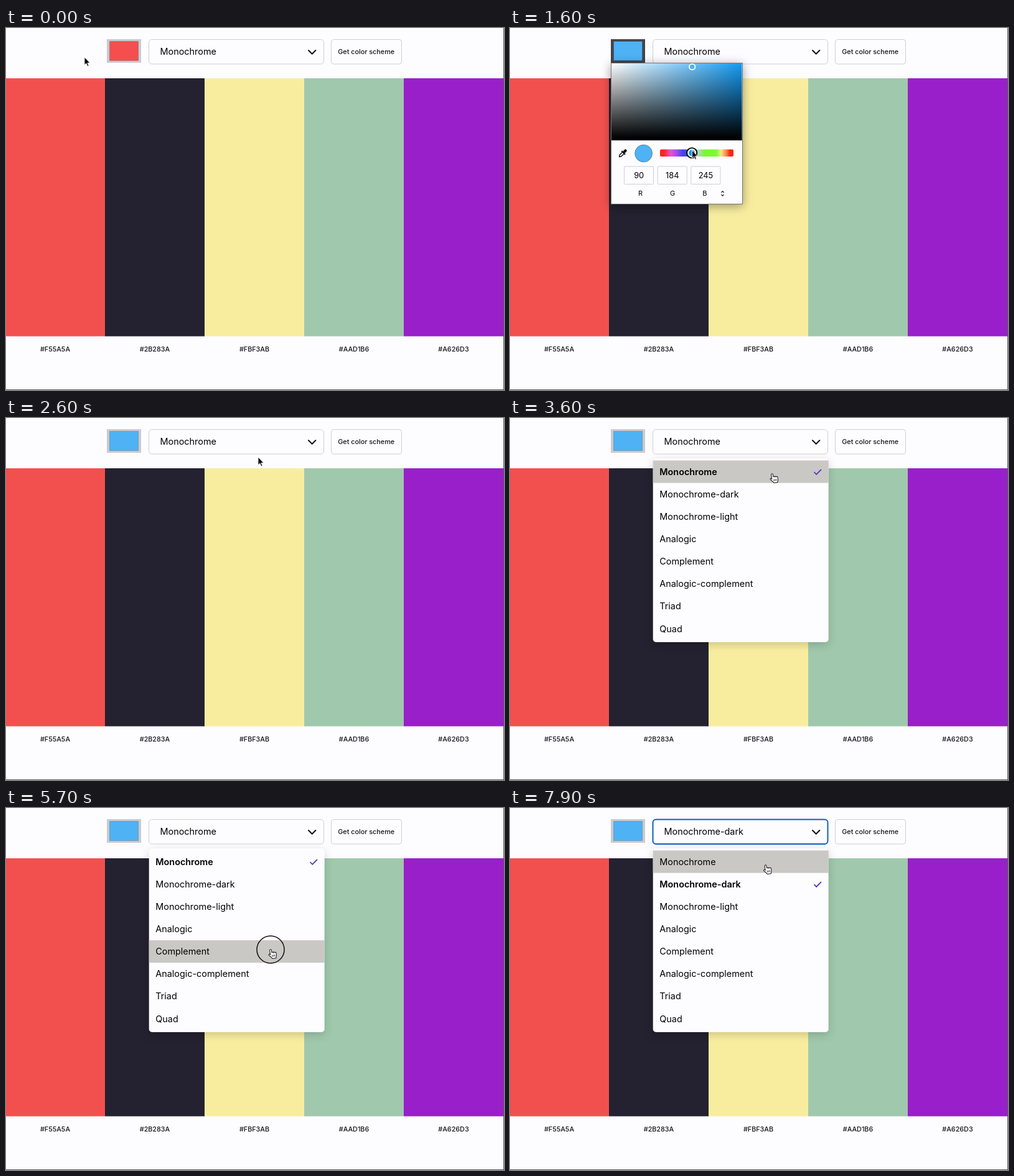
These frames come from a looping animation (800x583 px, 8 s). An HTML page:

```html
<!DOCTYPE html>
<html lang="en">
<head>
<meta charset="utf-8">
<title>Color scheme picker</title>
<style>
html, body { margin: 0; width: 100%; height: 100%; overflow: hidden; background: #fdfcff; }
svg { display: block; width: 100%; height: 100%; }
text { font-family: Inter, sans-serif; font-size: 14.4px; fill: #000; }
.small { font-size: 10.8px; font-weight: 500; fill: #14141c; text-anchor: middle; }
.num { font-size: 12.8px; text-anchor: middle; }
.rgb { font-size: 11px; text-anchor: middle; }
.box { fill: #fdfcff; stroke: #cfcfd4; }
#picker { filter: drop-shadow(0 3px 8px rgba(0, 0, 0, .38)); }
#menu { filter: drop-shadow(0 4px 7px rgba(0, 0, 0, .17)); }
</style>
</head>
<body>
<svg viewBox="0 0 800 583" preserveAspectRatio="none">
  <defs>
    <linearGradient id="sat"><stop stop-color="#fff"/><stop id="pure" offset="1"/></linearGradient>
    <linearGradient id="dark" x2="0" y2="1"><stop stop-opacity="0"/><stop offset=".97"/></linearGradient>
    <linearGradient id="hues">
      <stop offset=".05" stop-color="#fb2616"/><stop offset=".15" stop-color="#e552dc"/>
      <stop offset=".24" stop-color="#9a4ae8"/><stop offset=".31" stop-color="#4444ea"/>
      <stop offset=".41" stop-color="#3c50ee"/><stop offset=".46" stop-color="#5cb4e8"/>
      <stop offset=".52" stop-color="#b4d8bc"/><stop offset=".61" stop-color="#76fa30"/>
      <stop offset=".77" stop-color="#7cfb36"/><stop offset=".83" stop-color="#f4e88c"/>
      <stop offset=".9" stop-color="#f68a4c"/><stop offset=".95" stop-color="#fb2616"/>
    </linearGradient>
  </defs>
  <rect width="800" height="583" fill="#fdfcff"/>
  <g id="bars"></g>
  <path d="M799.5 0V583M0 582.5H800" stroke="#5c5b62"/>

  <rect id="frame" x="162" y="18" width="55" height="38"/>
  <rect id="swatch" x="166.5" y="21.5" width="46" height="31" stroke="#000" stroke-opacity=".18"/>
  <rect id="select" class="box" x="229.5" y="18.5" width="281" height="39.5" rx="5"/>
  <text id="choice" x="247.6" y="43.2"></text>
  <path d="M486 36l5.7 5.7 5.7-5.7" fill="none" stroke="#111" stroke-width="2" stroke-linecap="round" stroke-linejoin="round"/>
  <rect class="box" x="522.5" y="18.5" width="113" height="39.5" rx="4"/>
  <text class="small" x="578.7" y="41.6">Get color scheme</text>

  <g id="picker">
    <rect x="162.5" y="56.5" width="211" height="227" fill="#fdfcff" stroke="#77777c"/>
    <rect x="163" y="57" width="209.5" height="124" fill="url(#sat)"/>
    <rect x="163" y="57" width="209.5" height="124" fill="url(#dark)"/>
    <circle id="svFocus" cx="292.7" cy="62.5" r="6.5" fill="none" stroke="#000" stroke-width="2.2"/>
    <circle id="svThumb" cx="292.7" cy="62.5" r="4.7" stroke="#fff" stroke-width="1.8"/>
    <g transform="translate(181 202) rotate(45)" stroke="#111">
      <rect x="-1.7" y="-8" width="3.4" height="6" rx="1.6" fill="#111"/>
      <path d="M-4-1.6H4" stroke-width="2"/>
      <path d="M-1.8-1V5L0 7.6 1.8 5V-1" fill="none" stroke-width="1.4"/>
    </g>
    <circle id="dot" cx="214.6" cy="202" r="14" stroke="#000" stroke-opacity=".3"/>
    <rect x="241" y="195.5" width="118" height="11.5" rx="2" fill="url(#hues)"/>
    <g id="hueThumb">
      <circle id="hueFocus" r="8" fill="none" stroke="#000" stroke-width="2"/>
      <circle id="hueDot" r="6" stroke="#fff" stroke-width="2"/>
    </g>
    <g id="fields"></g>
    <path d="M339.4 265l2.1-2.2 2.1 2.2M339.4 268.2l2.1 2.2 2.1-2.2" fill="none" stroke="#111" stroke-width="1.1"/>
  </g>

  <g id="menu">
    <rect x="229.7" y="65" width="282" height="296" rx="5" fill="#fdfcff"/>
    <rect id="hover" x="229.7" width="282" height="36.15" fill="#c9c8c4"/>
    <g id="options"></g>
    <path id="check" d="M488.5 .5l3.7 3.8 7.8-8" fill="none" stroke="#4b2fd0" stroke-width="1.7"/>
  </g>

  <circle id="ring" fill="none" stroke="#111" stroke-width="1.5"/>
  <g id="cursor">
    <path id="arrow" d="M0 0V12.6L2.9 10 5 14.7 7 13.8 4.9 9.3H8.9z" fill="#000" stroke="#fff" stroke-width=".9"/>
    <g id="hand" transform="rotate(-8)">
      <path d="M-1.5 8V1.2a1.4 1.4 0 0 1 2.8 0V5.2a1.3 1.2 0 0 1 2.5 .2 1.2 1.1 0 0 1 2.3 .5 1.1 1.1 0 0 1 2 .9V10.2c0 2-1.2 2.5-1.3 4.6H.7C.5 13-1.8 11.6-3.8 8.6c-.9-1.5 .9-2.6 2.3-.6z" fill="#fff" stroke="#111"/>
      <path d="M1.4 9v3M3.4 9v3M5.4 9v3" stroke="#111" stroke-width=".8"/>
    </g>
  </g>
</svg>
<script>
const LOOP = 8000, STEP = 100, ROW = 36.15, TOP = 68.4;
const $ = id => document.getElementById(id);
const set = (id, attrs) => { for (const k in attrs) $(id).setAttribute(k, attrs[k]); };
const show = (id, on) => { $(id).style.display = on ? '' : 'none'; };
const within = (t, spans) => spans.some(([a, b]) => t >= a && t < b);

const bars = [['#F55A5A', '#f2504f'], ['#2B283A', '#242130'], ['#FBF3AB', '#f8ed9f'],
  ['#AAD1B6', '#a0c8ac'], ['#A626D3', '#991fcb']];
const names = ['Monochrome', 'Monochrome-dark', 'Monochrome-light', 'Analogic',
  'Complement', 'Analogic-complement', 'Triad', 'Quad'];

const path = [[0, 126, 47], [500, 188, 47], [700, 188, 47], [1000, 303, 98], [1300, 241, 198],
  [1600, 292.5, 197], [1800, 293, 198], [2100, 392, 215], [2300, 392, 215], [2600, 405, 63],
  [2800, 410, 60], [3000, 421, 42], [3200, 421, 42], [3600, 421, 90], [3900, 421, 90],
  [4600, 421.5, 119], [4800, 421.5, 119], [5200, 425, 334], [5600, 425, 228], [5800, 425, 228],
  [6300, 431.5, 44.5], [6600, 431.5, 44.5], [6900, 425, 119], [7100, 425, 119],
  [7300, 415, 46], [7600, 415, 46], [7800, 411, 90], [7900, 410.5, 92]];
const clicks = [600, 2200, 3100, 5700, 6400, 7000, 7500];
const pickerOpen = [[700, 2300]];
const menuOpen = [[3200, 5800], [6600, 7200], [7600, 8000]];
const choices = [[0, 0], [5800, 4], [7200, 1]];

$('bars').innerHTML = bars.map(([hex, fill], i) =>
  `<rect x="${i ? i * 160 - 1 : 0}" y="81" width="${i ? 160 : 159}" height="415.5" fill="${fill}"/>
   <text class="small" x="${79 + i * 160}" y="521">${hex}</text>`).join('');
$('fields').innerHTML = [...'RGB'].map((c, i) =>
  `<rect class="box" x="${183.5 + i * 53.7}" y="223" width="47" height="28.5" rx="1"/>
   <text class="num" id="num${i}" x="${207.2 + i * 53.6}" y="241.7"></text>
   <text class="rgb" x="${209.5 + i * 51.7}" y="270">${c}</text>`).join('');
$('options').innerHTML = names.map((n, i) =>
  `<text id="opt${i}" x="240.3" y="${91.5 + i * ROW}">${n}</text>`).join('');

function place(t) {
  const n = path.findIndex(p => p[0] > t);
  if (n < 0) return path[path.length - 1].slice(1);
  const [t0, x0, y0] = path[n - 1], [t1, x1, y1] = path[n];
  const u = (t - t0) / (t1 - t0), e = u * u * (3 - 2 * u);
  return [x0 + (x1 - x0) * e, y0 + (y1 - y0) * e];
}

function hsv(h, s, v) {
  return [5, 3, 1].map(n => {
    const k = (n + h / 60) % 6;
    return Math.round(255 * v * (1 - s * Math.max(0, Math.min(k, 4 - k, 1))));
  });
}
const css = rgb => `rgb(${rgb})`;

function draw(t) {
  const [x, y] = place(t);
  const picking = within(t, pickerOpen), open = within(t, menuOpen);

  const hueX = t < 1300 ? 241 : t < 1600 ? x : 292.2;
  const hue = (360 - (hueX - 241) / 118 * 360) % 360;
  const color = css(hsv(hue, .68, .955)), pure = css(hsv(hue, .92, .95));
  show('picker', picking);
  set('frame', { fill: picking ? '#44454a' : '#c9cad0' });
  set('swatch', { fill: color });
  set('dot', { fill: color });
  set('svThumb', { fill: color });
  set('pure', { 'stop-color': pure });
  set('hueDot', { fill: pure });
  set('hueThumb', { transform: `translate(${hueX} 201.2)` });
  show('svFocus', t < 1300);
  show('hueFocus', t >= 1300);
  hsv(hue, .631, .961).forEach((v, i) => { $('num' + i).textContent = v; });

  const choice = choices.filter(c => c[0] <= t).pop()[1];
  const row = Math.floor((y - TOP) / ROW);
  const hovering = open && row >= 0 && row < names.length;
  const focus = t >= 7500;
  $('choice').textContent = names[choice];
  $('select').style.stroke = focus ? '#0a5fc0' : '';
  $('select').style.strokeWidth = focus ? 2 : 1;
  show('menu', open);
  show('hover', hovering);
  set('hover', { y: TOP + row * ROW });
  set('check', { transform: `translate(0 ${86.5 + choice * ROW})` });
  names.forEach((_, i) => { $('opt' + i).style.fontWeight = i === choice ? 600 : 400; });

  const click = clicks.find(c => t >= c && t < c + 200);
  show('ring', click !== undefined);
  set('ring', { cx: x, cy: y, r: t - click < 100 ? 22 : 27.5 });

  const pointer = hovering || (y > 18 && y < 58 && x > 229 && x < 511 && !picking);
  show('hand', pointer);
  show('arrow', !pointer);
  set('cursor', { transform: `translate(${x} ${y})` });
}

function tick(now) {
  draw(Math.floor(now % LOOP / STEP) * STEP);
  requestAnimationFrame(tick);
}
draw(0);
requestAnimationFrame(tick);
</script>
</body>
</html>
```
